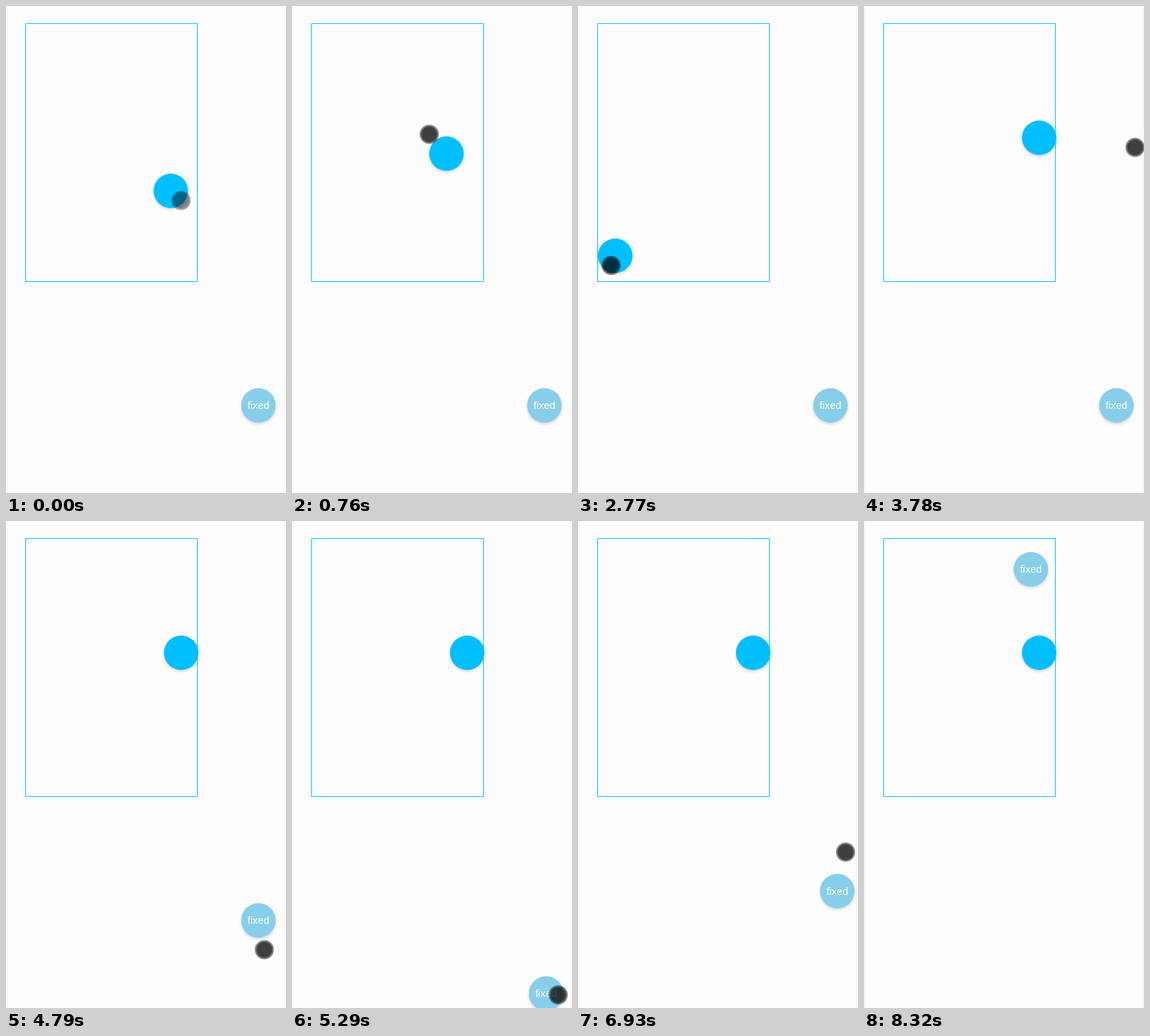
An HTML page that plays this animation: 406 px wide and 706 px high, repeating every 9.57 s.

```html
<!DOCTYPE html>
<html lang="en">
<head>
<meta charset="utf-8">
<title>Draggable balls</title>
<style>
  html, body { margin: 0; width: 100%; height: 100%; overflow: hidden; background: #fdfdfd; }
  svg { display: block; width: 406px; height: 706px; }
  text { font: 15px "Liberation Sans", Arial, sans-serif; fill: #fff; text-anchor: middle; }
</style>
</head>
<body>
<svg viewBox="0 0 406 706">
  <defs>
    <filter id="soft" x="-30%" y="-30%" width="160%" height="160%">
      <feGaussianBlur stdDeviation="2"/>
    </filter>
    <radialGradient id="touch">
      <stop offset="0.76" stop-opacity="0.75"/>
      <stop offset="0.86" stop-opacity="0.54"/>
      <stop offset="1" stop-opacity="0.36"/>
    </radialGradient>
    <radialGradient id="hover">
      <stop offset="0.74" stop-opacity="0.48"/>
      <stop offset="1" stop-opacity="0.26"/>
    </radialGradient>
    <circle id="shade" cy="2" r="25" opacity="0.16" filter="url(#soft)"/>
  </defs>
  <path d="M1.5 0V706M404.5 0V706" stroke="#f4f4f4"/>
  <rect x="28.5" y="25.5" width="249" height="374" fill="none" stroke="deepskyblue"/>
  <g id="inner">
    <use href="#shade"/>
    <circle r="25" fill="deepskyblue"/>
  </g>
  <g id="fixed">
    <use href="#shade"/>
    <circle r="25" fill="skyblue"/>
    <text y="5">fixed</text>
  </g>
  <circle id="cursor" r="14"/>
</svg>
<script>
const LOOP = 9570, TICK = 126.05, TICKS = 76, GONE = 66;

// Pointer route: [tick, x, y] is a place to reach, [tick] a rest until then.
const route = [
  [0, 254, 282], [2], [4, 279, 270], [9, 79, 60], [10, 64, 69], [12, 38, 386],
  [17], [18, 42, 380], [20], [21, 48, 376],
  [23], [26, 170, 528], [29, 393, 205], [30], [32, 390, 186], [35, 360, 602], [36, 374, 595],
  [37], [41, 376.5, 701], [42, 386, 687], [44, 300, 425], [45, 122, 430], [46, 80, 684],
  [47, 36, 533], [48, 6, 505], [50, 150, 369], [53, 380, 625], [55, 388, 480],
  [57, 164, 200], [58, 250, 86], [59], [60, 192, 44],
  [62], [64, 263, 533], [TICKS]
];

// A pressed ball follows the pointer one tick late, inside its bounds.
const balls = {
  inner: { pos: [239, 268], grip: [15, 14], held: [3, 31], min: [54, 51], max: [254, 374] },
  fixed: { pos: [366, 579], grip: [8, 16], held: [38, 60], min: [25, 25], max: [381, 700] }
};

const clamp = (v, lo, hi) => Math.min(hi, Math.max(lo, v));
const mix = (a, b, u) => a.map((v, i) => v + (b[i] - v) * u);

function trace() {
  const points = [];
  let [tick, ...here] = route[0];
  for (const [end, ...place] of route.slice(1)) {
    const goal = place.length ? place : here;
    for (let n = tick; n < end; n++) points[n] = mix(here, goal, (n - tick) / (end - tick));
    tick = end;
    here = goal;
  }
  return points;
}

function simulate(points) {
  return points.map((point, n) => {
    const state = { cursor: point, pressed: false };
    for (const [name, b] of Object.entries(balls)) {
      if (n >= b.held[0] && n < b.held[1]) {
        state.pressed = true;
        b.pos = points[n - 1].map((v, i) => clamp(v - b.grip[i], b.min[i], b.max[i]));
      }
      state[name] = b.pos;
    }
    return state;
  });
}

const states = simulate(trace());
const parts = ["inner", "fixed", "cursor"].map(id => [id, document.getElementById(id)]);
const cursor = document.getElementById("cursor");

function draw(time) {
  const n = Math.min(TICKS - 1, Math.floor((time % LOOP + 6) / TICK));
  const state = states[n];
  for (const [id, el] of parts) el.setAttribute("transform", `translate(${state[id]})`);
  cursor.setAttribute("fill", state.pressed ? "url(#touch)" : "url(#hover)");
  cursor.setAttribute("visibility", n < GONE ? "visible" : "hidden");
}

const begin = performance.now();
function frame() {
  draw(performance.now() - begin);
  requestAnimationFrame(frame);
}
frame();
</script>
</body>
</html>
```
